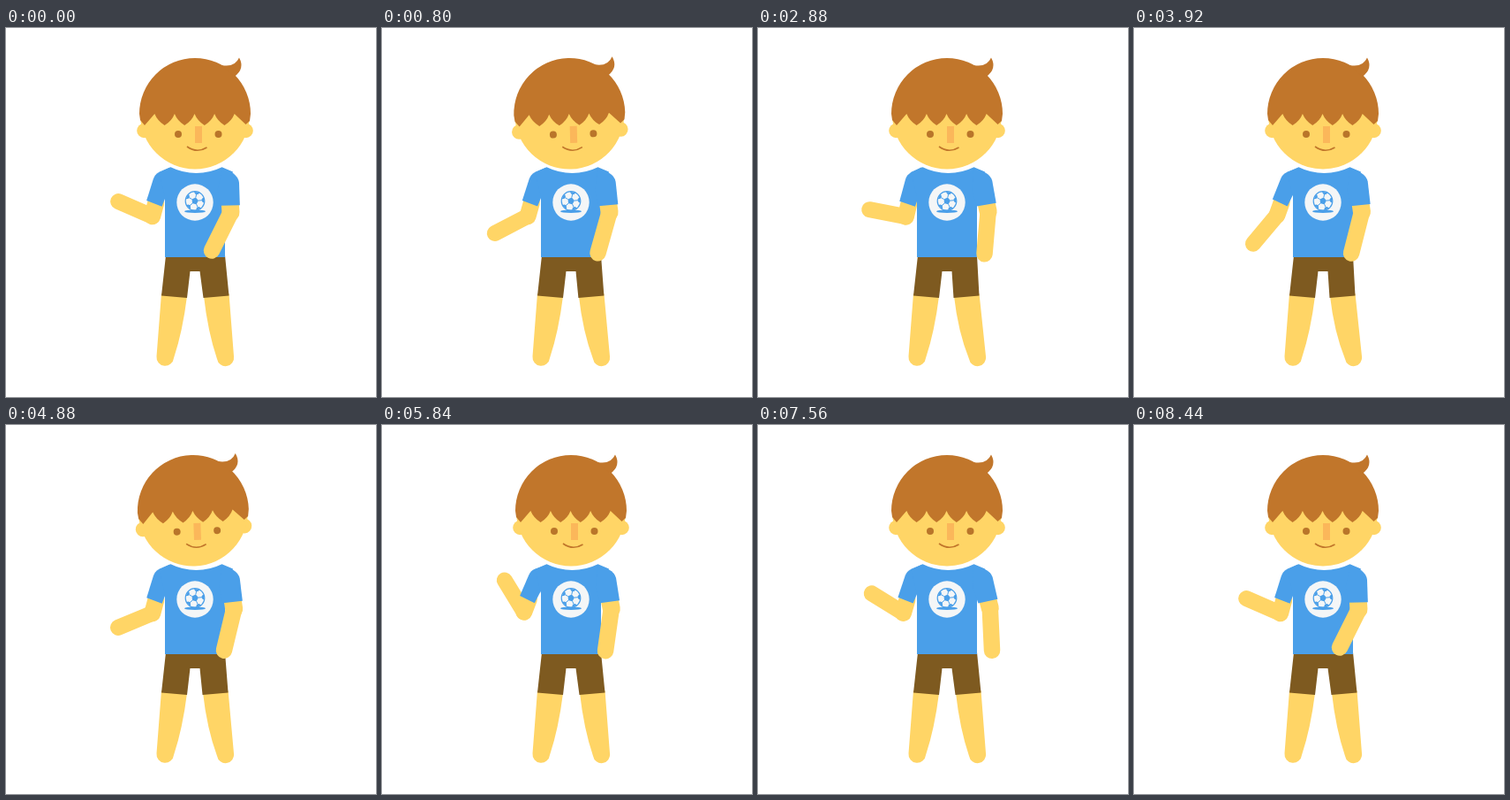
An HTML page that plays this animation: 419x417 px, repeating every 8480 ms.

```html
<!DOCTYPE html>
<html lang="en">
<head>
<meta charset="utf-8">
<title>Waving boy</title>
<style>
html, body { margin: 0; width: 100%; height: 100%; overflow: hidden; background: #fff; }
svg { display: block; width: 419px; height: 417px; }
.skin { fill: #ffd566; }
.limb { fill: none; stroke: #ffd566; stroke-linecap: round; }
.hair { fill: #c1762b; }
.shirt { fill: #4a9fe9; }
.shorts { fill: #7e5a20; }
.ink { fill: none; stroke: #4a9fe9; stroke-width: 1.2; }
</style>
</head>
<body>
<svg viewBox="0 0 419 417">
  <path class="skin" d="M176 300L205 303Q200 343 190 373A9.500 9.500 0 0 1 170.500 371Z"/>
  <path class="skin" id="leg"/>
  <path class="shorts" d="M181 257H216V275H208.500L205 305L176 302.500Z"/>
  <path class="shorts" id="shorts"/>

  <g id="leftArm">
    <path class="limb" stroke-width="19" d="M168 197L163 212"/>
    <g id="leftFore"><path class="limb" stroke-width="18" d="M0 0H-42"/></g>
    <path class="shirt" d="M186 158L173 163Q168.500 165 166.500 170L157.500 194L174.500 201.500L184 181Z"/>
  </g>

  <path class="shirt" d="M186.500 157.300A66 66 0 0 0 244.500 157.300L257 162.500L248 190V259H180V190L173 163Z"/>
  <circle cx="214" cy="197" r="20.700" fill="#f4f6f7"/>
  <ellipse class="shirt" cx="214" cy="207.300" rx="12" ry="1.700"/>
  <circle class="ink" cx="214" cy="195.500" r="10.800"/>
  <g id="ball"></g>

  <g id="rightArm">
    <path class="limb" stroke-width="20" d="M260 198L262.300 207"/>
    <g id="rightFore"><path class="limb" stroke-width="18.500" d="M0 0V48"/></g>
    <path class="shirt" d="M244 159L257 163Q263.500 166 265.500 172L271 197L249 201.500L243 184Z"/>
  </g>

  <g id="head">
    <circle class="skin" cx="156.500" cy="116" r="8.300"/>
    <circle class="skin" cx="271.500" cy="116" r="8.300"/>
    <circle class="skin" cx="214" cy="97.500" r="62"/>
    <path class="hair" id="hair"/>
    <path class="hair" d="M244 42Q259 45 264 33.500Q271 46 258.500 55Z"/>
    <rect x="214" y="111" width="8" height="19" fill="#fbb75a"/>
    <circle cx="195" cy="120" r="4" fill="#b9752a"/>
    <circle cx="240.500" cy="120" r="4" fill="#b9752a"/>
    <path d="M205 134Q216 142 227.500 135" fill="none" stroke="#c1762b" stroke-width="1.600"/>
  </g>
</svg>
<script>
const LOOP = 8480, STEP = 40, WRAP = 8440;
const $ = id => document.getElementById(id);

// Forearm poses: [time in ms, angle].
const leftWave = [[0, 23.5], [850, -28], [1680, 43], [2880, 11], [3900, -50],
  [4880, -22.5], [5840, 58.5], [6850, 8], [8200, 52]];
const rightSwing = [[0, 26.5], [1900, -1.5], [4200, 15], [8200, -4]];

// Smooth curve through the poses, flat at every turning point.
function slope(keys, i) {
  if (i < 1 || i > keys.length - 2) return 0;
  const rate = j => (keys[j + 1][1] - keys[j][1]) / (keys[j + 1][0] - keys[j][0]);
  const before = rate(i - 1), after = rate(i);
  return before * after <= 0 ? 0 : 2 * before * after / (before + after);
}

function sample(keys, t) {
  const i = keys.findIndex(k => k[0] > t) - 1;
  if (i < 0) return keys[keys.length - 1][1];
  const [t0, v0] = keys[i], [t1, v1] = keys[i + 1];
  const d = t1 - t0, u = (t - t0) / d, w = 1 - u;
  return v0 * w * w * (1 + 2 * u) + v1 * u * u * (3 - 2 * u)
    + d * u * w * (slope(keys, i) * w - slope(keys, i + 1) * u);
}

// 0 before a, 1 after b, eased between.
function ramp(t, a, b) {
  const u = Math.min(1, Math.max(0, (t - a) / (b - a)));
  return u * u * (3 - 2 * u);
}

// Rises to 1 at mid and falls back.
const bump = (t, mid, half) => ramp(t, mid - half, mid) - ramp(t, mid, mid + half);

const turn = (id, angle, x, y) =>
  $(id).setAttribute('transform', `rotate(${angle} ${x} ${y})`);
const hinge = (id, angle, x, y) =>
  $(id).setAttribute('transform', `translate(${x} ${y}) rotate(${angle})`);

function draw(time) {
  let t = Math.floor(time % LOOP / STEP) * STEP;
  if (t >= WRAP) t = 0;

  // The upper arms follow the forearms.
  const foreL = sample(leftWave, t), upperL = 0.17 * Math.abs(foreL) - 7.2;
  turn('leftArm', upperL, 178, 165);
  hinge('leftFore', foreL - upperL, 163, 212);

  const foreR = sample(rightSwing, t), upperR = 0.38 * (foreR + 1);
  turn('rightArm', upperR, 250, 165);
  hinge('rightFore', foreR - upperR, 262.3, 207);

  turn('head', -2 * (bump(t, 1000, 650) + bump(t, 4960, 720)), 214, 160);

  const s = 2 * (ramp(t, 4000, 5700) - ramp(t, 0, 1500));
  $('shorts').setAttribute('d',
    `M215 257H248L${252.5 + s} 302.500L${223.5 + s} 305L219.500 275H215Z`);
  $('leg').setAttribute('d',
    `M${224 + s} 303L${252.5 + s} 300L258 371A9.500 9.500 0 0 1 239 374Q${228.5 + s} 343 ${224 + s} 303Z`);
}

// Cap of hair with a fringe of even, rounded teeth.
function drawHair() {
  const tooth = 'q-3 8 -11.300 13q-8 -5 -11.300 -13';
  $('hair').setAttribute('d', 'M151 97A63 63 0 0 1 277 97L276 105L271.500 109L258.700 97'
    + tooth.repeat(4) + 'L157 110L152 104Z');
}

// Ball: a middle pentagon, seams and rim patches.
function drawBall() {
  const point = (r, deg) => {
    const a = deg * Math.PI / 180;
    return `${214 + r * Math.cos(a)} ${195.5 + r * Math.sin(a)}`;
  };
  const middle = [];
  let seams = '', rim = '';
  for (let k = 0; k < 5; k++) {
    const a = k * 72 - 78;
    middle.push(point(4, a));
    seams += `M${point(4, a)}L${point(8.5, a)}`;
    rim += `M${point(10.8, a - 18)}L${point(8, a - 11)}L${point(8, a + 11)}L${point(10.8, a + 18)}Z`;
  }
  $('ball').innerHTML = `<path class="shirt" d="M${middle.join('L')}Z${rim}"/>`
    + `<path class="ink" style="stroke-width:1" d="${seams}"/>`;
}

drawHair();
drawBall();
const start = performance.now();
function tick() {
  draw(performance.now() - start);
  requestAnimationFrame(tick);
}
tick();
</script>
</body>
</html>
```
